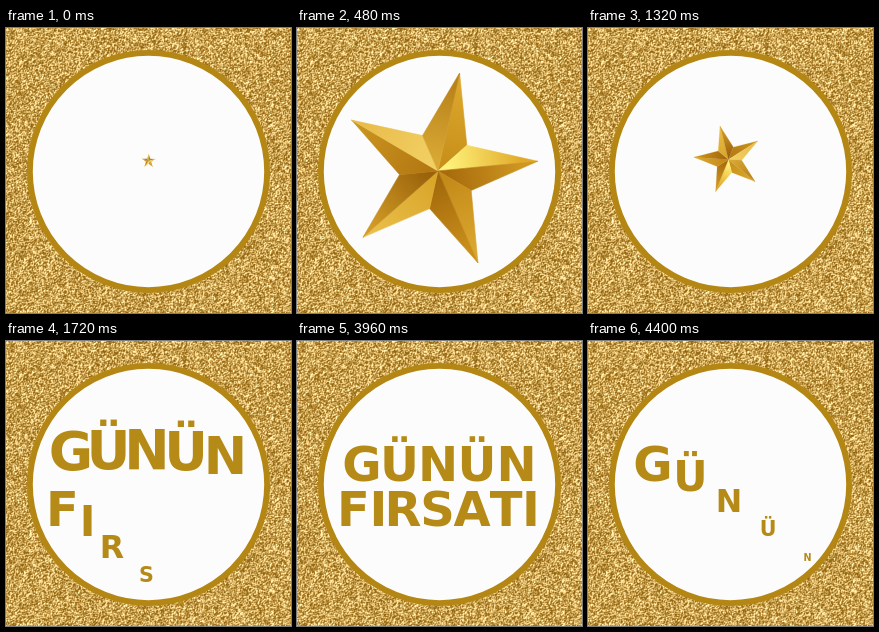
These frames come from a looping animation (285x285 px, 4.44 s). An HTML page with a canvas:

```html
<!DOCTYPE html>
<html lang="tr">
<head>
<meta charset="utf-8">
<style>
  html, body { margin: 0; width: 100%; height: 100%; overflow: hidden; background: #c9a559; }
  canvas, svg { position: absolute; left: 0; top: 0; width: 285px; height: 285px; }
  text { font: bold 48px "DejaVu Sans", sans-serif; fill: #b68a16; text-anchor: middle; }
</style>
</head>
<body>
<canvas id="glitter" width="285" height="285"></canvas>
<svg id="stage" viewBox="0 0 285 285">
  <circle cx="142.5" cy="143.5" r="118.6" fill="#fcfcfc" stroke="#b48614" stroke-width="5.8"/>
  <g id="star"></g>
  <g id="words"></g>
</svg>
<script>
const SIZE = 285, LOOP = 4440, STEP = 40;
const clamp = v => Math.max(0, Math.min(1, v));
const add = (parent, tag, attrs) => {
  const el = document.createElementNS('http://www.w3.org/2000/svg', tag);
  for (const name in attrs) el.setAttribute(name, attrs[name]);
  return parent.appendChild(el);
};

function drawGlitter() {
  const ctx = document.getElementById('glitter').getContext('2d');
  const img = ctx.createImageData(SIZE, SIZE);
  const dark = [146, 100, 14], light = [275, 246, 176];
  let seed = 7;
  const rnd = () => (seed = (seed * 16807) % 2147483647) / 2147483647;
  const grain = Array.from({ length: SIZE * SIZE + SIZE + 1 }, rnd);
  for (let i = 0; i < SIZE * SIZE; i++) {
    const v = (0.5 * grain[i] + 0.25 * grain[i + 1] + 0.25 * grain[i + SIZE] - 0.5) * 1.3 + 0.5;
    const glow = Math.max(0, v) ** 1.25;
    for (let c = 0; c < 3; c++) img.data[i * 4 + c] = dark[c] + (light[c] - dark[c]) * glow;
    img.data[i * 4 + 3] = 255;
  }
  ctx.putImageData(img, 0, 0);
}

// Star: ten facets, clockwise from the right half of the top arm.
const R = 109, star = document.getElementById('star');
const facets = [
  ['#c8901a', '#dba62c'], ['#fff27a', '#e0a928'],
  ['#a86c0c', '#cf9722'], ['#c48a18', '#d9a62e'],
  ['#a4690b', '#c98f1c'], ['#d9a62a', '#e8bd48'],
  ['#9a620a', '#d09a26'], ['#b47812', '#c8921e'],
  ['#f2cf62', '#e9bd4c'], ['#d8a834', '#b9831a']
];
const polar = (r, deg) => {
  const a = deg * Math.PI / 180;
  return [r * Math.sin(a), -r * Math.cos(a)];
};
function buildStar() {
  facets.forEach((colors, i) => {
    const tip = polar(R, Math.ceil(i / 2) * 72);
    const notch = polar(R * 0.385, 36 + Math.floor(i / 2) * 72);
    const grad = add(star, 'linearGradient', {
      id: 'facet' + i, gradientUnits: 'userSpaceOnUse', x1: 0, y1: 0, x2: tip[0], y2: tip[1]
    });
    colors.forEach((color, n) => add(grad, 'stop', { offset: n ? 0.85 : 0.1, 'stop-color': color }));
    const fill = `url(#facet${i})`;
    add(star, 'path', {
      d: `M0 0L${tip}L${notch}Z`, fill, stroke: fill, 'stroke-width': 0.6, 'stroke-linejoin': 'round'
    });
  });
}

// The star spins about the centre of its bounding box while it scales.
function poseStar(t) {
  let s, turn;
  if (t < 1080) {
    const q = t < 80 ? 0 : clamp((t - 40) / 520);
    s = 1 - 0.935 * (1 - q) ** 1.31;
    turn = 155;
  } else {
    s = clamp((1540 - t) / 500) ** 1.4;
    turn = 190;
  }
  star.style.display = s > 0 ? '' : 'none';
  star.setAttribute('transform',
    `translate(143 133.6) rotate(${turn * (1 - s)}) scale(${s}) translate(0 10.4)`);
}

// Each line: middle height, text and letter centres.
const lines = [
  { y: 122, text: 'GÜNÜN', xs: [65, 102.5, 141, 180, 219.5] },
  { y: 167.3, text: 'FIRSATI', xs: [56.5, 81.5, 106, 140.5, 175, 209, 234] }
];
const words = document.getElementById('words');
const letters = lines.flatMap(({ y, text, xs }) => xs.map((x, i) => {
  const el = add(words, 'text', { y: 17.5 });
  el.textContent = text[i];
  return { el, x, y };
}));

// Letter scale per stagger unit: rise past full size, then settle.
const rise = [0, 0.2, 0.43, 0.66, 0.88, 1, 1.08, 1.12, 1.13];
const PEAK = rise.length - 1, SETTLE = 19;
function scaleAt(k) {
  if (k <= 0) return 0;
  if (k < PEAK) {
    const i = Math.floor(k);
    return rise[i] + (rise[i + 1] - rise[i]) * (k - i);
  }
  const q = clamp((k - PEAK) / SETTLE);
  return 1 + (rise[PEAK] - 1) * (1 + Math.cos(Math.PI * q)) / 2;
}

function poseWords(t) {
  const front = t < 1640 ? 0 : Math.min((t - 1590) / 13, (4465 - t) / 13);
  letters.forEach(({ el, x, y }, i) => {
    const s = scaleAt(front - i), rest = 1 - s;
    const drop = 120 * Math.sign(rest) * Math.abs(rest) ** 1.07;
    el.style.display = s > 0 ? '' : 'none';
    el.setAttribute('transform', `translate(${x} ${y + drop}) scale(${s})`);
  });
}

function render(now) {
  const t = Math.floor((now % LOOP) / STEP) * STEP;
  poseStar(t);
  poseWords(t);
}

drawGlitter();
buildStar();
render(0);
const start = performance.now();
(function tick() {
  render(performance.now() - start);
  requestAnimationFrame(tick);
})();
</script>
</body>
</html>
```
